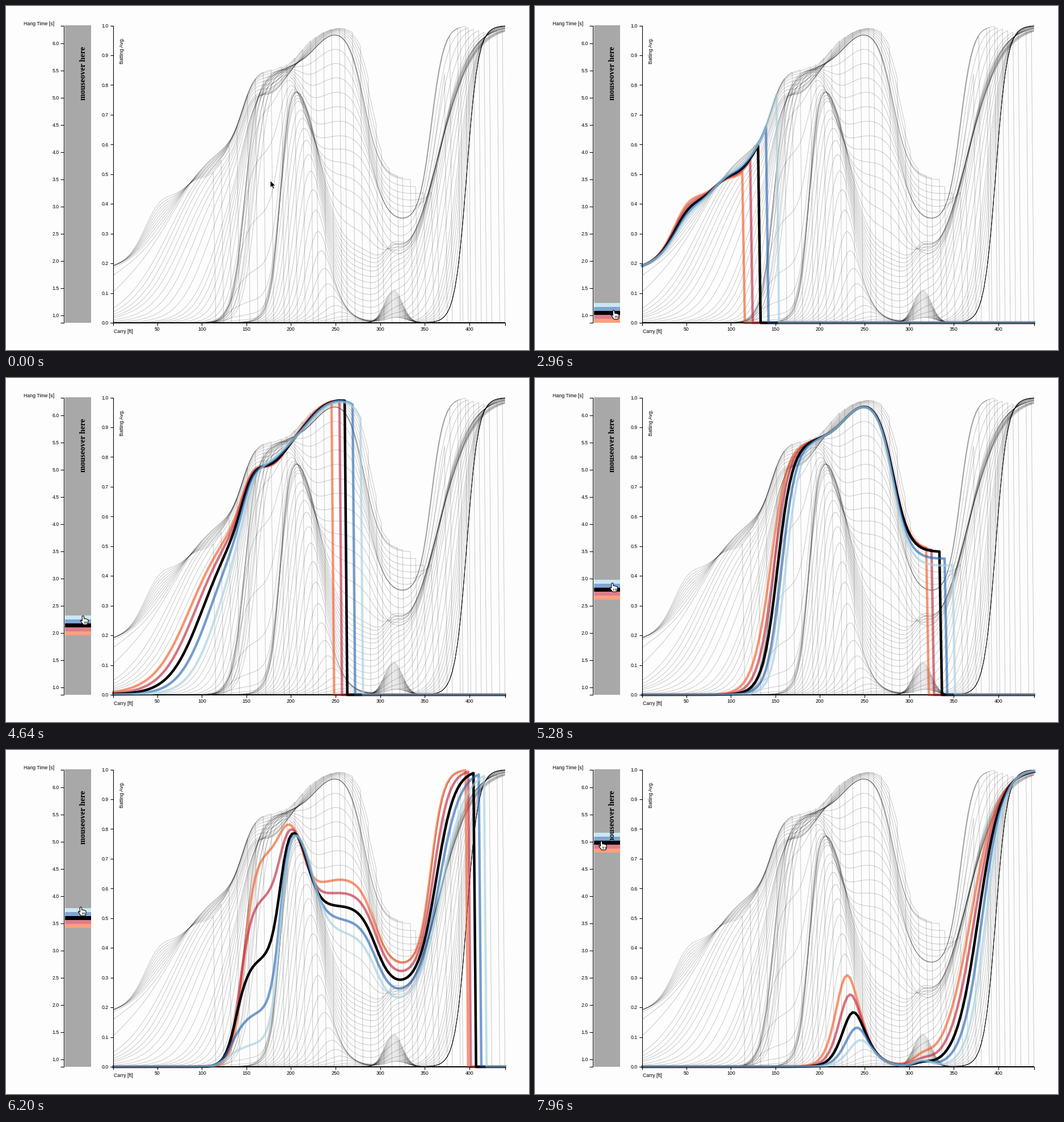
These frames come from a looping animation (922x607 px, 8000 ms). A matplotlib script:

```python
import matplotlib.pyplot as plt
import numpy as np
from matplotlib.animation import FuncAnimation
from matplotlib.collections import LineCollection
from matplotlib.patches import Polygon, Rectangle

W, H, DPI = 922, 607, 64
FRAMES, STEP = 200, 40
PT = 72 / DPI                      # points per pixel
LEFT, RIGHT, TOP, BASE = 189, 880, 34.5, 559
BAR_L, BAR_R = 104, 150
BAND, LAG = 7, 160                 # height of one hang-time band, highlight delay
COUNT = 75

x = np.linspace(0.8, 440, 150)     # carry in feet
k = np.arange(COUNT)[:, None]      # hang-time band, one row per curve


def step(center, width):
    """Smooth rise from 0 to 1 along the carry axis."""
    return 1 / (1 + np.exp(-np.clip((x - center) / width, -50, 50)))


def bell(center, width, at=x):
    return np.exp(-((at - center) / width) ** 2)


def track(*keys):
    """Parameter that changes with the band, given as (band, value) pairs."""
    return np.interp(k, *zip(*keys))


def ramp(start, length):
    return np.clip(k - start, 0, length)


def batting_average():
    # no fielder arrives in time: short fly balls fall in more with distance
    quick = np.clip(1 - k / 8, 0, 1)
    free = (0.17 + 0.45 * step(70, 24) + 0.24 * step(146, 7)
            + 0.14 * step(215 + 1.1 * ramp(12, 12), 11)
            + quick * (0.09 * bell(50, 22) - 0.05 * bell(112, 18))
            - 0.07 * bell(15, 5, k) * bell(178, 22))

    # infielders cover the near side, then everything short of the gap
    near = step(track((6, -90), (8, -30), (10, 25), (14, 64), (19, 118), (24, 140),
                      (28, 161), (32, 146), (35, 145), (39, 127)),
                track((8, 20), (14, 27), (19, 18), (24, 10), (28, 8), (36, 6)))
    late = ramp(45, 30)
    gap = step(188 + 3.2 * late + 0.1 * late ** 2, 5.5 + 0.5 * ramp(42, 4))
    share = 1 / (1 + np.exp(k - 36.7))
    infield = share * near + (1 - share) * gap

    # outfielders: a shallow fall behind the gap, a deep one further out
    shallow = track((28, 0), (35, 0.36), (39, 0.55), (42, 0.75), (47, 0.85), (54, 1))
    floor = track((20, 0.5), (26, 0.48), (32, 0.34), (35, 0.335), (39, 0.2),
                  (46, 0.11), (54, 0))
    deep = np.maximum(1 - shallow - floor, 0)
    outfield = (1 - shallow * step(213 + 2.4 * ramp(35, 7), 7 + 0.6 * ramp(35, 7))
                - deep * step(282 + 2.5 * np.maximum(24 - k, 0)
                              + 1.6 * ramp(28, 8), 9))

    # beyond the wall everything is a hit
    wall = step(track((28, 385), (32, 358), (35, 357), (39, 369), (50, 362),
                      (54, 369), (58, 386), (64, 397)),
                track((35, 7), (42, 18), (46, 20), (54, 15), (58, 10), (64, 6.5)))
    pocket = track((39, 0), (43, 0.07), (50, 0.05), (56, 0.01), (74, 0.11))

    v = free * infield * outfield + pocket * bell(315, 14)
    v = v + (1 - v) * wall
    reach = track((0, 113), (8, 190), (24, 320), (33, 388), (37, 405), (42, 438),
                  (43, 500))
    return np.where(x > reach, 0, np.clip(v, 0, 1))


def px(ft):
    return 188 + 1.572 * np.asarray(ft)


def py(v):
    return BASE - (BASE - TOP) * np.asarray(v)


curves = [np.column_stack([px(x), py(row)]) for row in batting_average()]

# pointer path: time, x, y
PATH = np.array([
    (120, 466, 308), (960, 152, 578), (1280, 152, 578), (1680, 143, 563),
    (2720, 140, 548), (3720, 135, 504), (3960, 134, 482), (5120, 137, 376),
    (6040, 133, 295), (6320, 131, 264), (6520, 131, 264), (7040, 127, 218),
    (7800, 119, 163), (7960, 117, 161)])


def pointer(t):
    return np.array([np.interp(t, PATH[:, 0], PATH[:, c]) for c in (1, 2)])


def on_bar(p):
    return BAR_L <= p[0] <= BAR_R and TOP <= p[1] < BASE


fig = plt.figure(figsize=(W / DPI, H / DPI), dpi=DPI, facecolor="#fdfdfd")
ax = fig.add_axes([0, 0, 1, 1])
ax.set(xlim=(0, W), ylim=(H, 0))
ax.axis("off")


def line(xs, ys):
    ax.plot(xs, ys, color="black", lw=1.1 * PT, zorder=5, solid_capstyle="butt")


def label(lx, ly, s, size=8.8, **kw):
    ax.text(lx, ly, s, fontsize=size * PT, va="baseline", zorder=6,
            rotation_mode="anchor", **{"family": "Liberation Sans", **kw})


# hang-time bar and its axis
ax.add_patch(Rectangle((BAR_L, TOP - 0.5), BAR_R - BAR_L, BASE - TOP + 0.5,
                       fc="#a8a8a8", lw=0))
line([96, 101.5, 101.5, 96], [TOP, TOP, BASE, BASE])
for h in np.arange(1, 6.5, 0.5):
    y = 642 - 96 * h
    line([96, 101.5], [y, y])
    label(94, y + 3.2, f"{h:.1f}", ha="right")
label(31, 34, "Hang Time [s]")
label(140, 165.5, "mouseover here", 14.1, rotation=90,
      family="Liberation Serif", weight="bold")

# chart axes
line([184, LEFT, LEFT, 184], [TOP, TOP, BASE, BASE])
line([LEFT, RIGHT, RIGHT], [BASE, BASE, BASE + 5])
line([LEFT, LEFT], [BASE, BASE + 5])
for v in np.arange(11) / 10:
    line([184, LEFT], [py(v)] * 2)
    label(181, py(v) + 3.2, f"{v:.1f}", ha="right")
for ft in range(50, 401, 50):
    line([px(ft)] * 2, [BASE, BASE + 5])
    label(px(ft), 573, str(ft), ha="center")
label(190, 577, "Carry [ft]")
label(207, 101.5, "Batting Avg.", rotation=90)

ax.add_collection(LineCollection(curves, colors=[(0, 0, 0, 0.24)],
                                 linewidths=0.85 * PT, zorder=2))

# five highlighted neighbours, from two bands below to two above
STYLES = [("#fa5f28", 0.6), ("#c5263f", 0.6), ("black", 1),
          ("#2869b9", 0.6), ("lightblue", 0.6)]
clip = Rectangle((LEFT, 0), RIGHT - LEFT, BASE + 1.5, transform=ax.transData)
marks = []
for color, alpha in STYLES:
    back, band = [
        ax.add_patch(Rectangle((BAR_L, 0), BAR_R - BAR_L, BAND, lw=0, **kw))
        for kw in (dict(fc="white", zorder=3),
                   dict(fc=color, alpha=alpha, zorder=3.1))]
    curve, = ax.plot([], [], color=color, alpha=alpha, lw=4.5 * PT, zorder=4,
                     solid_joinstyle="round", clip_path=clip)
    marks.append((back, band, curve))

ARROW = np.array([(0, 0), (0, 12.6), (2.8, 10), (5, 14.8), (7.2, 13.8),
                  (5.1, 9.3), (9, 9)])
HAND = np.array([(-1.5, 0.6), (0, -0.4), (1.5, 0.6), (1.8, 5), (4, 4.8), (6.5, 5.6),
                 (8.8, 6.6), (9.3, 8), (8.8, 12), (7.5, 15.3), (0.5, 15.3),
                 (-2, 12), (-4.5, 8.5), (-3.8, 7.2), (-1.5, 8.8)])
arrow = ax.add_patch(Polygon(ARROW, fc="black", ec="white", lw=0.9 * PT, zorder=8))
hand = ax.add_patch(Polygon(HAND, fc="white", ec="black", lw=1.1 * PT, zorder=8))
FINGERS = [np.array([(fx, 9), (fx, 13)]) for fx in (2, 4.3, 6.6)]
fingers = ax.add_collection(LineCollection(FINGERS, colors="black",
                                           linewidths=0.8 * PT, zorder=9))


def draw(frame):
    t = frame * STEP
    tip, seen = pointer(t), pointer(t - LAG)
    over = on_bar(tip)
    arrow.set_visible(not over)
    hand.set_visible(over)
    fingers.set_visible(over)
    arrow.set_xy(ARROW + tip)
    hand.set_xy(HAND + tip)
    fingers.set_segments([f + tip for f in FINGERS])

    mid = int((BASE - seen[1]) // BAND)
    for n, parts in enumerate(marks, mid - 2):
        shown = on_bar(seen) and 0 <= n < COUNT
        for part in parts:
            part.set_visible(shown)
        if shown:
            back, band, curve = parts
            back.set_y(BASE - BAND * (n + 1))
            band.set_y(BASE - BAND * (n + 1))
            curve.set_data(curves[n].T)
    return []


anim = FuncAnimation(fig, draw, frames=FRAMES, interval=STEP, repeat=True,
                     repeat_delay=0)
plt.show()
```
